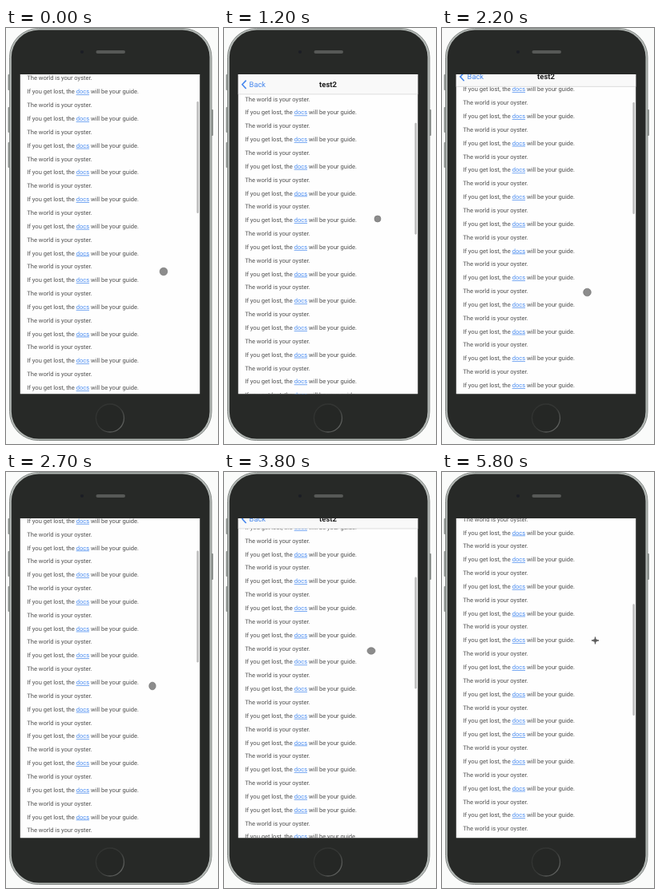
Animation, 265 px wide and 521 px high, one loop 5.9 s. Source, as an HTML page:

```html
<!DOCTYPE html>
<html lang="en">
<head>
<meta charset="utf-8">
<title>Collapsing header</title>
<style>
html, body { margin: 0; width: 100%; height: 100%; overflow: hidden; background: #fafbfa; }
svg { display: block; }
text { font-family: Roboto, "Liberation Sans", sans-serif; text-rendering: geometricPrecision; }
#list text { font-size: 7.55px; fill: #505050; }
#list .link { fill: #4c8df0; text-decoration: underline; }
</style>
</head>
<body>
<svg width="265" height="521" viewBox="0 0 265 521">
  <defs>
    <clipPath id="screen"><rect x="17.5" y="58" width="225" height="400.5"/></clipPath>
    <linearGradient id="ring" x1="0" y1="0" x2="1" y2="1">
      <stop offset="0" stop-color="#303230"/>
      <stop offset=".5" stop-color="#353735"/>
      <stop offset="1" stop-color="#737573"/>
    </linearGradient>
  </defs>

  <g fill="#8b908d">
    <rect x="2.5" y="58" width="3" height="20" rx="1"/>
    <rect x="2.5" y="99" width="3" height="32" rx="1"/>
    <rect x="2.5" y="143" width="3" height="32" rx="1"/>
    <rect x="256" y="102" width="3" height="33" rx="1"/>
  </g>
  <rect x="4.5" y=".5" width="252.5" height="516" rx="36" fill="#b4b9b6" stroke="#858a87"/>
  <rect x="6.8" y="2.5" width="247.7" height="512" rx="34" fill="#272927"/>
  <circle cx="95" cy="30" r="2" fill="#1b1d24"/>
  <rect x="112.5" y="28" width="36.5" height="4" rx="2" fill="#575957"/>
  <circle cx="130" cy="488.5" r="17.5" fill="#252725" stroke="url(#ring)" stroke-width="1.3"/>

  <g clip-path="url(#screen)">
    <rect x="17.5" y="58" width="225" height="400.5" fill="#fefefe"/>
    <g id="list"></g>
    <rect id="thumb" x="238.4" y="0" width="2.6" height="140" rx="1.3" fill="#bdbdbd"/>
    <g id="header">
      <rect x="17.5" y="58" width="225" height="25" fill="#f9f9f9"/>
      <rect x="17.5" y="82.6" width="225" height=".7" fill="#cfcfcf"/>
      <path d="M27.6 65.6 L22.8 70.8 L27.6 76" fill="none" stroke="#4586ee" stroke-width="1.6"/>
      <text x="31.6" y="74" font-size="9.3" fill="#4586ee">Back</text>
      <text x="130" y="74" font-size="9.5" font-weight="700" text-anchor="middle" fill="#202020">test2</text>
    </g>
  </g>

  <g id="pointer">
    <ellipse id="dot" fill="#8c8c8c" stroke="#767676" stroke-width=".7"/>
    <path id="cross" d="M-4.5 0H4.5M0 -4.5V4.5" stroke="#555" stroke-width="1.3"/>
  </g>
</svg>
<script>
const LOOP = 5900, STEP = 100, ROW = 16.85, SEAM = 518;

// time, scroll, header hidden by, pointer x, y, radius x, y
const keys = [
  [0,      0, 25,   197,   305, 4.8, 4.8],
  [600,  103, 25,   195,   203, 4.5, 4.5],
  [1200,  75,  0,   192,   239, 4,   4],
  [1400,  74,  0,   191,   240, 4.4, 4.4],
  [2000,  -7,  0,   182.5, 341, 4.8, 4.8],
  [2200,   3,  9.7, 181.5, 331, 4.8, 4.8],
  [2700,  18.5, 25, 183,   268, 4.2, 4.8],
  [3500, 124, 25,   183.5, 205, 4.5, 4.5],
  [3800, 111.5, 12, 184,   224, 5,   4.2],
  [4200, 104,  0,   184.5, 270, 4.5, 4.5],
  [4700, 105.5, 0,  185,   308, 4.4, 4.4],
  [4900, 107,  1.5, 185.5, 306, 4.5, 4.5],
  [5600, 202, 25,   190,   215, 4.5, 4.5],
  [5800, 206, 25,   191.5, 211, 2.3, 2.1]
];

const $ = id => document.getElementById(id);
const move = (el, x, y) => el.setAttribute("transform", `translate(${x} ${y})`);

// Two blocks of alternating lines meet at row 0.
let rows = "";
for (let i = -30; i <= 12; i++) {
  const guide = i < 1 ? i % 2 === 0 : i % 2 === 1;
  const label = guide
    ? 'If you get lost, the <tspan class="link">docs</tspan> will be your guide.'
    : "The world is your oyster.";
  rows += `<text x="26.3" y="${i * ROW + 2.4}">${label}</text>`;
}
$("list").innerHTML = rows;

function pose(t) {
  let i = 0;
  while (i < keys.length - 2 && t >= keys[i + 1][0]) i++;
  const a = keys[i], b = keys[i + 1];
  const p = Math.min(1, (t - a[0]) / (b[0] - a[0]));
  const e = p * p * (3 - 2 * p);
  return a.map((v, n) => v + (b[n] - v) * e);
}

function draw(time) {
  const t = Math.floor(time % LOOP / STEP) * STEP;
  const [, scroll, hidden, x, y, rx, ry] = pose(t);
  move($("list"), 0, SEAM - scroll);
  move($("thumb"), 0, 92 + scroll * 0.355);
  move($("header"), 0, -hidden);
  move($("pointer"), x, y);
  $("dot").setAttribute("rx", rx);
  $("dot").setAttribute("ry", ry);
  $("cross").style.display = t >= 5800 ? "" : "none";
}

const start = performance.now();
function tick() {
  draw(performance.now() - start);
  requestAnimationFrame(tick);
}
tick();
</script>
</body>
</html>
```
